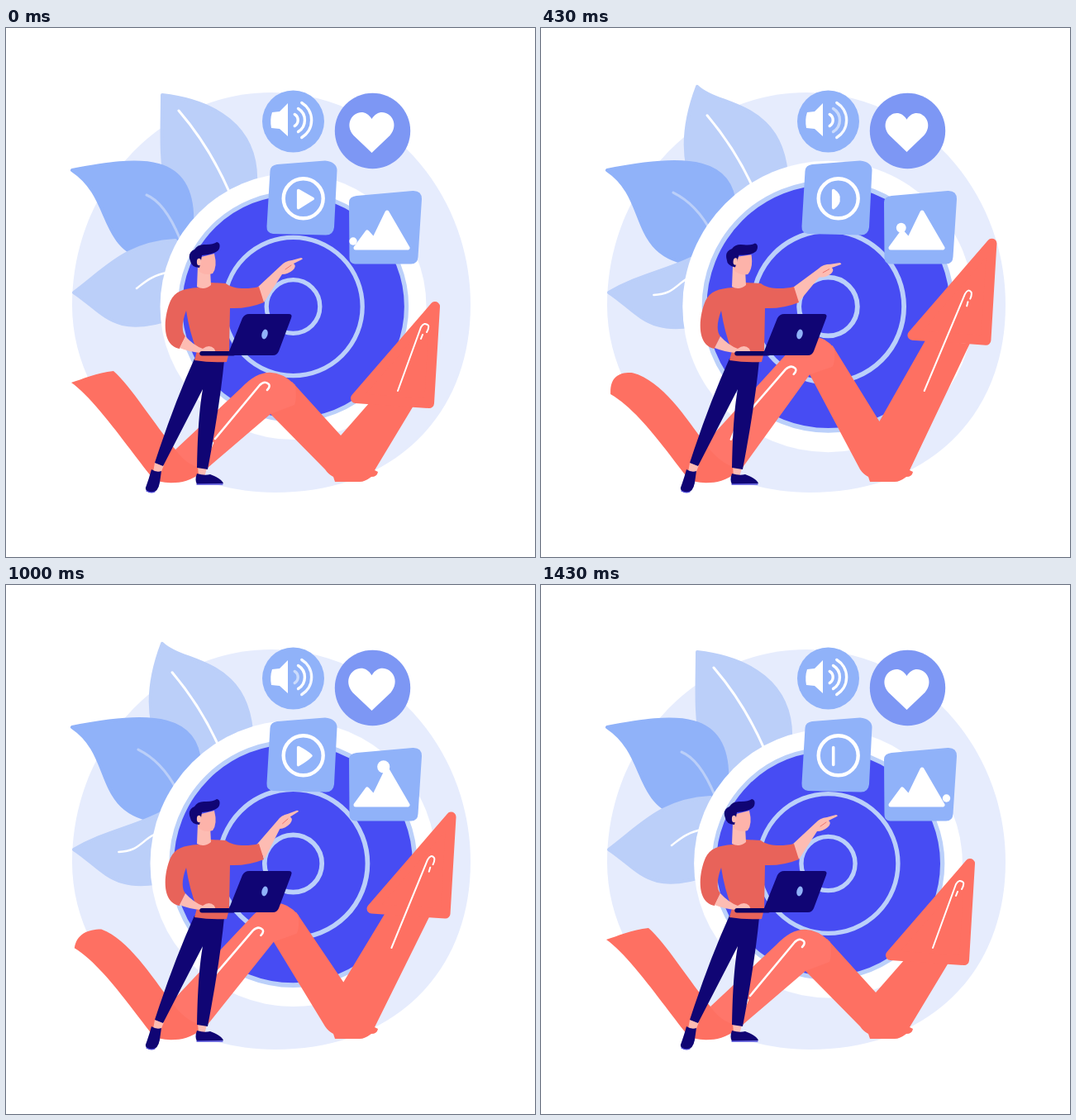
These frames come from a looping animation (640 px wide and 640 px high, 1.5 s). An HTML page:

```html
<!DOCTYPE html>
<html lang="en">
<head>
<meta charset="utf-8">
<title>Growth strategy</title>
<style>
  html, body { margin: 0; width: 100%; height: 100%; overflow: hidden; background: #fff; }
  svg { display: block; width: 100%; height: 100%; stroke-linecap: round; stroke-linejoin: round; }
  .line { fill: none; stroke: #fff; }
  .coral { fill: #fe7062; }
  .leaf { stroke-width: 4; }
  .pale { fill: #bbcff9; stroke: #bbcff9; }
  .sky { fill: #90b2f9; }
  .skin { fill: #fdbcb3; }
  .navy { fill: #100574; }
  .white { fill: #fff; }
</style>
</head>
<body>
<svg viewBox="0 0 640 640">
  <path fill="#e6ecfd" d="M321 78C454 78 562 193 562 335C562 471 467 562 325 562C190 562 80 460 80 335C80 193 188 78 321 78Z"/>

  <!-- In data-d, "x~dx" is a coordinate and how far it travels. -->
  <g id="leaves">
    <path class="leaf pale" data-d="M189 81~-14C250~-48 88~12 306~-16 118~-43 302~-6 190~-5L240 250C180~-20 220~-20 189~-34 150~-20 189 81~-14Z"/>
    <path class="line" stroke-width="3" data-d="M209~-11 100~8Q246~-12 143~8 270~-14 198~4"/>
    <path class="leaf sky" stroke="#90b2f9" data-d="M80 172C160~30 157~-8 230~2 148~18 225~13 240~-33L175~5 282~4C110~-5 265~10 131 206 80 172Z"/>
    <path class="line" style="stroke:#bbcff9" stroke-width="3" data-d="M170~-14 202~-4Q192~-5 211~3 210~-5 254~-9"/>
    <path class="leaf pale" data-d="M82 320C120~5 292~5 145~25 260~45 205 257~13L205 350~8C130 376 120 345 82 320Z"/>
    <path class="line" stroke-width="2.5" data-d="M158~-30 315~11C166~-1 309~18 178~-18 298~8 196~-10 296~4"/>
  </g>

  <g id="rings">
    <circle class="white" r="161"/>
    <g fill="#474cf3" stroke="#bbd0fa" stroke-width="5.3">
      <circle r="137"/><circle r="83.7"/><circle r="32.3"/>
    </g>
  </g>

  <circle class="sky" cx="347.5" cy="113" r="37.5"/>
  <path class="white" d="M322 102L331 101L341 91V131L331 122L321 121Q319 111 322 102Z"/>
  <g id="waves" class="line" stroke-width="3.4"></g>

  <circle cx="443.5" cy="124.5" r="45.7" fill="#7d97f4"/>
  <path id="heart" class="white" d="M0 25L-22 4C-38 -15 -12 -36 0 -16C12 -36 38 -15 22 4Z"/>

  <path class="sky" d="M328 165L386 160.5Q400 162 400.500 172L397 241Q396 250.5 387 250.5L323 249Q315 248 315.5 240L319.5 173Q320 166 328 165Z"/>
  <circle class="line" cx="359.7" cy="206.3" r="24" stroke-width="4.4"/>
  <path id="play" class="line" style="fill:#fff" stroke-width="3.6"/>

  <path class="sky" d="M424 203L492 197Q503 196.5 503 207L498.5 277Q498 285.5 490 285.5H422Q415.5 285 415.5 278L415 211Q415 204 424 203Z"/>
  <path class="line" style="fill:#fff" stroke-width="5" d="M423 266L437 247L445 256L461 223L486 266Z"/>
  <circle id="sun" class="white"/>

  <g id="arrow">
    <path class="coral" data-d="M79~7 429~19C92~-12 425~-5 110~-20 417~-1 130~-26 415~3C150~-5 432~-8 180~-5 480~-10 205~-9 510~-10L242 534Q222 550 205 550Q185 551 178 545C165~-15 532~-22 110~15 450~20 79~7 429~19Z"/>
    <path class="coral" data-d="M346~9 428~-60L405~6 493~-23L440~35 453~-104L493~35 457~-102L446 535L450 537Q449 543 442 543Q434 549 428 549H398L396 543Q390 540 386 534L320~7 467~-65Z"/>
    <path fill="#ff766a" data-d="M205~-9 510~-10L285~27 435~-67Q318~20 400~-54 350~7 432~-60Q352~6 449~-63 349~5 456~-63L320~7 467~-65L243 533Q220 532 205~-9 510~-10Z"/>
    <path class="coral" stroke="#fe7062" stroke-width="12" data-d="M519~36 337~-104L512~36 454~-104L423~36 448~-104Z"/>
    <path class="line" stroke-width="2.5" data-d="M253~-19 497~-25L307~-15 432~-26Q313~-14 426~-26 318~-14 431~-26Q320~-14 434~-26 316~-14 438~-26M250~-22 502~-19L246~-22 511~-18"/>
    <path class="line" stroke-width="2" data-d="M474~-14 439L502~15 362~-55Q506~15 355~-55 511~13 360~-55Q512~13 363~-55 509~14 368~-55M504~17 371~-54L502~18 376~-54"/>
  </g>

  <path class="skin" d="M180 526L191 529L187 539L178 537ZM232 531L243 533L240 543L233 542Z"/>
  <path class="navy" d="M176 534Q182 538 188 536L186 550Q184 562 176 562Q168 561 169 556Q173 545 176 534ZM231 539Q240 542 247 540Q261 545 263 551L231 552Q228 547 231 539Z"/>
  <path class="line" style="stroke:#4b48d6" stroke-width="1.3" d="M170 560Q175 563 180 561M231 552H262"/>
  <path class="navy" d="M228 400Q245 404 264 402Q259 455 244 534L231 532Q232 470 238 437L190 530L180 526Q203 455 228 400Z"/>

  <g id="forearm">
    <path class="skin" d="M303 315L332 288Q337 282 346 281L357 278Q360 279 358 280L348 285Q352 288 347 293Q341 298 334 298L312 332Z"/>
    <path class="line" style="stroke:#e8645c" stroke-width=".8" d="M338 292L345 287"/>
  </g>
  <path fill="#e8635a" d="M232 314C215 315 204 319 199 330C191 348 187 384 210 388L217 373C212 367 213 355 218 342Q222 368 231 391L228 402Q248 405 267 404L270 392L271 339Q292 340 312 332L306 313C290 317 272 315 266 309L248 308Z"/>
  <path class="skin" d="M217 373Q227 384 238 388Q246 382 252 388L254 393H236Q222 392 210 387ZM232 288L247 292L248 311Q240 318 231 313Z"/>
  <g id="head">
    <path fill="#fdb3aa" d="M232 278L252 273Q256 289 250 297Q240 300 233 294Z"/>
    <path class="navy" d="M234 290Q224 289 223 282Q219 272 228 268Q232 261 242 262Q251 262 255 259Q260 260 258 267Q256 273 237 275L236 281Z"/>
    <ellipse class="skin" cx="233.5" cy="283" rx="2.6" ry="4.2"/>
  </g>

  <path class="line" style="stroke:#0c0362" stroke-width="5.4" d="M237 393.700H275"/>
  <path class="navy" d="M270 391L286 351Q289 346 294 346H342Q347 346 345 351L330 391Q328 396 323 396H268Z"/>
  <ellipse class="sky" cx="313" cy="370.5" rx="3.6" ry="6" transform="rotate(14 313 370.5)"/>
</svg>
<script>
  const LOOP = 1500, STEPS = 21, LAST = STEPS - 1;
  const $ = id => document.getElementById(id);
  const set = (el, attrs) => Object.entries(attrs).forEach(a => el.setAttribute(...a));

  // Straight up to 1 at the peak step, straight back to 0 at the end.
  const tent = (step, peak) => step < peak ? step / peak : (LAST - step) / (LAST - peak);

  function morph(id, v) {
    for (const el of $(id).querySelectorAll('[data-d]'))
      el.setAttribute('d', el.dataset.d.replace(/([\d.]+)~([-\d.]+)/g, (_, from, by) => +from + by * v));
  }

  const waves = [1, 2, 3].map(n => {
    const r = 8.2 * n, x = 345 + r * .52, h = r * .855;
    const arc = document.createElementNS('http://www.w3.org/2000/svg', 'path');
    set(arc, { d: `M${x} ${111.5 - h}A${r} ${r} 0 0 1 ${x} ${111.5 + h}` });
    return $('waves').appendChild(arc);
  });

  function draw(step) {
    const p = step / LAST;
    morph('leaves', 1.2 * tent(step, 10));
    morph('arrow', 1.04 * tent(step, 8.5));

    const radius = 169 - 8 * Math.cos(2 * Math.PI * step / 10.5);
    set($('rings'), { transform: `translate(347.5 337) scale(${radius / 161})` });
    set($('heart'), { transform: `translate(442.5 126) scale(${1 + .075 * Math.sin(4 * Math.PI * p)})` });

    const tilt = 10 * (1 - .55 * p) * Math.sin(2 * Math.PI * p ** .85);
    set($('forearm'), { transform: `rotate(${tilt} 305 322)` });
    set($('head'), { transform: `rotate(${Math.max(0, tilt) * .85} 240 300)` });

    // The play sign folds shut, opens and folds shut again.
    const w = step < 5 ? 1 - step / 5 : Math.sin(Math.PI * ((step - 5) / 15) ** .8);
    const left = 353.7, bend = left + 8.75 * w + 18 * w * (1 - w);
    set($('play'), { d: `M${left} 196.5Q${bend} 201.5 ${left + 17.5 * w} 206.5Q${bend} 212 ${left} 217.5Z` });

    const climb = tent(step, 16), side = step < 16 ? -42 : 28.5;
    set($('sun'), { cx: 462 + side * (1 - climb), cy: 258 - 43.5 * climb, r: 4.7 + 3.3 * climb });

    // The arcs dim in turn: middle, outer, inner.
    waves.forEach((arc, i) => {
      const dimmest = 4.5 + 5.5 * ((i + 2) % 3);
      set(arc, { opacity: 1 - .7 * Math.max(0, 1 - Math.abs(step - dimmest) / 4.5) });
    });
  }

  // Steps start on times rounded down to 10 ms, hence the small lead.
  function tick() {
    const t = performance.now() % LOOP;
    draw(Math.min(LAST, Math.floor((t + 5) * STEPS / LOOP)));
    requestAnimationFrame(tick);
  }
  tick();
</script>
</body>
</html>
```
